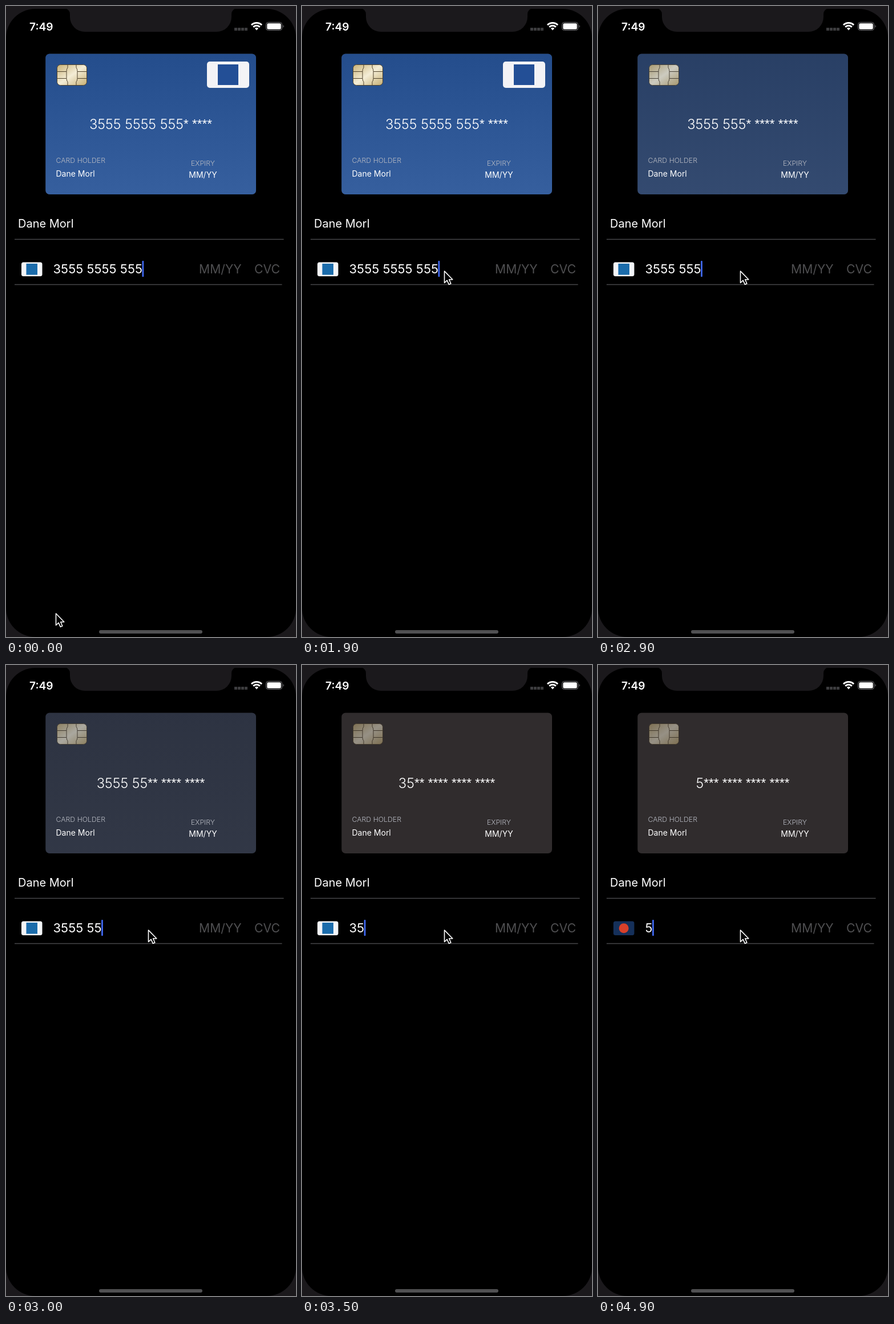
Write an HTML page that moves like this. It is 508 by 1102 pixels and loops after 5000 ms.

```html
<!DOCTYPE html>
<html lang="en">
<head>
<meta charset="utf-8">
<title>Card form</title>
<style>
  html, body { margin: 0; width: 100%; height: 100%; overflow: hidden; background: #000; }
  svg { display: block; width: 508px; height: 1102px; }
  text { font-family: Inter, Roboto, sans-serif; fill: #fff; white-space: pre; }
  .label { font-size: 12.3px; font-weight: 300; fill: #b9bcc4; }
  .value { font-size: 14px; }
  .field { font-size: 22px; }
  .hint { fill: #4f4f51; font-size: 21.2px; }
  .mid { text-anchor: middle; }
  #stars { font-family: "Liberation Sans", Arial, sans-serif; font-size: 22.5px; }
</style>
</head>
<body>
<svg viewBox="0 0 508 1102">
  <defs>
    <linearGradient id="blue" x2="0" y2="1">
      <stop stop-color="#244d8c"/><stop offset="1" stop-color="#365f9e"/>
    </linearGradient>
    <linearGradient id="gold" x2="1" y2="1">
      <stop stop-color="#c8b177"/><stop offset=".5" stop-color="#f4edd6"/><stop offset="1" stop-color="#c6af74"/>
    </linearGradient>
    <rect id="card" x="69.3" y="83.5" width="368.7" height="245.5" rx="7"/>
    <rect id="plate" x="27" y="447.5" width="36.5" height="24.5" rx="3.5"/>
  </defs>

  <!-- device frame -->
  <rect width="508" height="1102" fill="#1b191c"/>
  <rect y="5" width="508" height="1097" rx="51"/>
  <path d="M102 4Q112 5 112 15V19A26 26 0 0 0 138 45H369A26 26 0 0 0 395 19V15Q395 5 405 4Z" fill="#1b191c"/>
  <rect x="163" y="1090" width="181" height="6" rx="3" fill="#505052"/>

  <!-- status bar -->
  <text x="41" y="42.5" font-size="19.2" font-weight="600">7:49</text>
  <path d="M400 40.5H423" stroke="#3d3d3f" stroke-width="5" stroke-dasharray="5 1"/>
  <path d="M430 33.2A12.7 12.7 0 0 1 448 33.2M433.2 36.8A8 8 0 0 1 444.8 36.8" fill="none" stroke="#fff" stroke-width="3"/>
  <path d="M435.9 38.9Q439 36.8 442.1 38.9L439 42.4Z" fill="#fff"/>
  <rect x="455.5" y="28.5" width="28" height="14" rx="4" fill="none" stroke="#77777a"/>
  <rect x="457.3" y="30.2" width="24.4" height="10.6" rx="2.5" fill="#fff"/>
  <path d="M485.5 33Q488 35.5 485.5 38Z" fill="#77777a"/>

  <!-- card -->
  <use href="#card" fill="#302c2d"/>
  <use id="tint" href="#card" fill="url(#blue)"/>
  <g id="chip" fill="none" stroke="#50432c">
    <rect x="89.5" y="102.5" width="52" height="36" rx="6" fill="url(#gold)"/>
    <path d="M108 102.5v5q-2 3-2 6v13q0 4 2 6v6M123 102.5v5q2 3 2 6v13q0 4-2 6v6M89.5 114.5H106M89.5 126.5H106M125 114.5H141.5M125 126.5H141.5"/>
  </g>
  <g id="badge">
    <rect x="352" y="97" width="74" height="46" rx="5" fill="#f3f3f6"/>
    <rect x="371" y="102" width="36" height="36" fill="#234f96"/>
  </g>
  <text class="mid" x="253.5" y="215" font-size="23.7" font-weight="350"><tspan id="shown"></tspan><tspan id="stars" dy="-2.5"></tspan></text>
  <text class="label" x="87.5" y="273.5">CARD HOLDER</text>
  <text class="value" x="87.5" y="298">Dane Morl</text>
  <text class="label mid" x="345" y="279">EXPIRY</text>
  <text class="value mid" x="345" y="300">MM/YY</text>

  <!-- form -->
  <text x="21" y="387" font-size="20">Dane Morl</text>
  <path d="M15 407.5H486.5M15 486.5H483.5" stroke="#464648" stroke-width="1.3"/>
  <g id="blank">
    <use href="#plate" fill="#4f4f51"/>
    <path d="M27 455.5h36.5" stroke="#000" stroke-width="4"/>
  </g>
  <g id="first">
    <use href="#plate" fill="#f3f5f8"/>
    <rect x="35.5" y="450" width="19.5" height="19.5" fill="#1b6cab"/>
  </g>
  <g id="second">
    <use href="#plate" fill="#15305a"/>
    <circle cx="45.2" cy="459.7" r="8.5" fill="#d8402a"/>
  </g>
  <text id="ghost" class="hint" x="82.5" y="467">4242 4242 4242 4242</text>
  <text id="number" class="field" x="82.5" y="467"></text>
  <text class="hint" x="338" y="467">MM/YY</text>
  <text class="hint" x="435" y="467">CVC</text>
  <rect id="caret" y="445" width="2.8" height="28" rx="1" fill="#4069f2"/>

  <g id="menu">
    <path d="M206 379H274Q282 379 282 387V414Q282 422 274 422H250L240 432L230 422H206Q198 422 198 414V387Q198 379 206 379Z" fill="#3a363c"/>
    <text class="mid" x="240" y="407" font-size="17">Paste</text>
  </g>
  <path id="mouse" d="M1 1V21.5L5.6 17.2L8.9 24.3L12.3 22.8L9.2 15.8H15.3Z" fill="#000" stroke="#fff" stroke-width="1.6" stroke-linejoin="round"/>
</svg>
<script>
  const LOOP = 5000, STEP = 100;
  const TAP = 2000, ERASE = 2400, KEY_GAP = 130, RETYPE = 4400;
  const START = '35555555555';

  const $ = id => document.getElementById(id);
  const group = s => s.replace(/(.{4})(?=.)/g, '$1 ');
  const clamp = v => Math.min(1, Math.max(0, v));
  const ramp = (t, from, length) => clamp((t - from) / length);
  const smooth = p => p * p * (3 - 2 * p);
  const erasedAt = n => ERASE + KEY_GAP * (n - 1);
  const fade = (id, alpha) => $(id).setAttribute('opacity', alpha);

  function typed(t) {
    if (t >= RETYPE) return '5';
    const gone = Math.max(0, Math.floor((t - ERASE) / KEY_GAP) + 1);
    return START.slice(0, Math.max(0, START.length - gone));
  }

  function drawNumbers(digits) {
    const masked = group(digits.padEnd(16, '*'));
    const split = masked.indexOf('*');
    $('shown').textContent = masked.slice(0, split);
    $('stars').textContent = masked.slice(split);
    $('number').textContent = group(digits);
    const width = digits ? $('number').getComputedTextLength() : 0;
    $('caret').setAttribute('x', 82.5 + width - .5);
    fade('ghost', digits ? 0 : 1);
  }

  function drawMouse(t) {
    const sweep = smooth(ramp(t, 0, 750)), nudge = smooth(ramp(t, 1200, 400));
    const x = 86.5 + 160.5 * sweep + 1.5 * nudge;
    const y = 1060 - 563 * sweep - 35 * nudge;
    $('mouse').setAttribute('transform', `translate(${x} ${y})`);
  }

  function draw(t) {
    // The card loses its brand at the fourth deletion, the field icon at the tenth.
    const tint = 1 - ramp(t, erasedAt(4), 270);
    const unknown = ramp(t, erasedAt(10), 200), second = ramp(t, RETYPE, 200);

    drawNumbers(typed(t));
    drawMouse(t);
    fade('tint', tint);
    fade('chip', .52 + .48 * tint);
    fade('badge', t < erasedAt(4) ? 1 : 0);
    fade('first', 1 - unknown);
    fade('blank', unknown * (1 - second));
    fade('second', second);
    fade('menu', ramp(t, TAP, 200) * (1 - ramp(t, ERASE - 100, 120)));
    fade('caret', t < TAP ? clamp(.5 + .8 * Math.cos((t + 50) / 1000 * 2 * Math.PI)) : 1);
  }

  function tick() {
    draw(Math.floor(performance.now() % LOOP / STEP) * STEP);
    requestAnimationFrame(tick);
  }
  tick();
</script>
</body>
</html>
```
